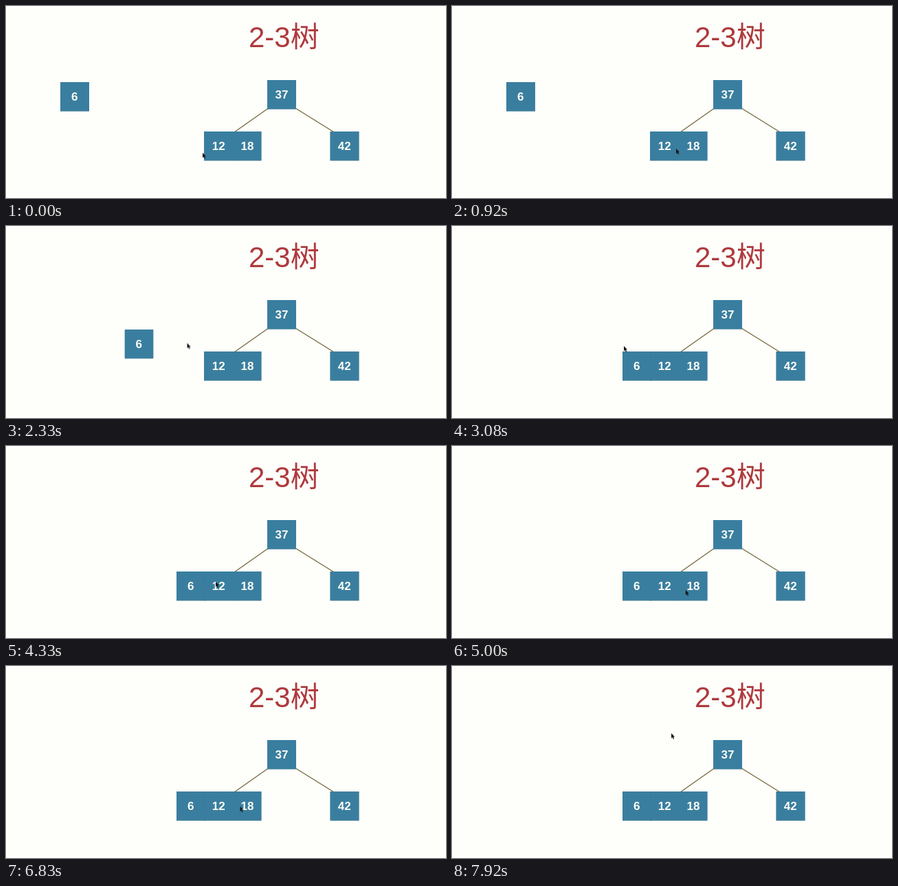
An HTML page that plays this animation: 640x280 px, repeating every 8000 ms.

```html
<!DOCTYPE html>
<html lang="zh-CN">
<head>
<meta charset="utf-8">
<title>2-3树</title>
<style>
  html, body { margin: 0; width: 100%; height: 100%; overflow: hidden; background: #fefefb; }
  svg { display: block; width: 640px; height: 280px; }
  .title { font: 300 42px "Liberation Sans", "Noto Sans CJK SC", "Noto Sans CJK", sans-serif; fill: #ae3a3d; }
  .edges { stroke: #716532; stroke-width: 1.2; fill: none; }
  .node rect { width: 42px; height: 42.5px; fill: #3a7e9f; }
  .node text { font: bold 17px "Liberation Sans", Arial, sans-serif; fill: #fbfdf6; text-anchor: middle; }
  .nodes { filter: drop-shadow(0 0.5px 0.7px rgba(70, 90, 60, .45)); }
  .seam { stroke: #34718f; stroke-width: 1; stroke-dasharray: 1 2; }

  #joining { animation: join 8s infinite; }
  #seam { animation: reveal 8s step-end infinite; }
  #cursor { animation: point 8s ease-in-out infinite; }

  @keyframes join {
    0%, 22.5% { transform: translate(79px, 111px); animation-timing-function: ease-in-out; }
    35%, 100% { transform: translate(248px, 183px); }
  }
  @keyframes reveal {
    0% { opacity: 0; }
    35%, 100% { opacity: 1; }
  }
  @keyframes point {
    0%, 1% { transform: translate(286px, 214px); }
    11.5%, 12.5% { transform: translate(326px, 208px); }
    19.75%, 22% { transform: translate(272px, 168px); }
    38.5%, 40% { transform: translate(250px, 175px); }
    47.5% { transform: translate(272px, 236px); }
    54.125%, 55% { transform: translate(305px, 198px); }
    63% { transform: translate(340px, 210px); }
    71.875%, 73% { transform: translate(366px, 212px); }
    82% { transform: translate(344px, 222px); }
    95%, 100% { transform: translate(319px, 98px); }
  }
</style>
</head>
<body>
<svg viewBox="0 0 640 280">
  <text class="title" x="353" y="60">2-3树</text>
  <path class="edges" d="M381 149.500 332 184M421 149 478 184.500"/>
  <g class="nodes">
    <g class="node" id="joining"><rect/><text x="20.700" y="27">6</text></g>
    <g class="node" transform="translate(288 183)"><rect/><text x="21.200" y="27">12</text></g>
    <g class="node" transform="translate(329.500 183)"><rect/><text x="21.500" y="27">18</text></g>
    <g class="node" transform="translate(380 108)"><rect/><text x="21" y="26.500">37</text></g>
    <g class="node" transform="translate(471.500 183)"><rect/><text x="20.700" y="27">42</text></g>
  </g>
  <path class="seam" id="seam" d="M289 184V225"/>
  <path id="cursor" d="M0 0V7.500L1.700 6 2.900 8.700 4.200 8.100 3 5.500 5 5.200Z" fill="#14191c"/>
</svg>
</body>
</html>
```
